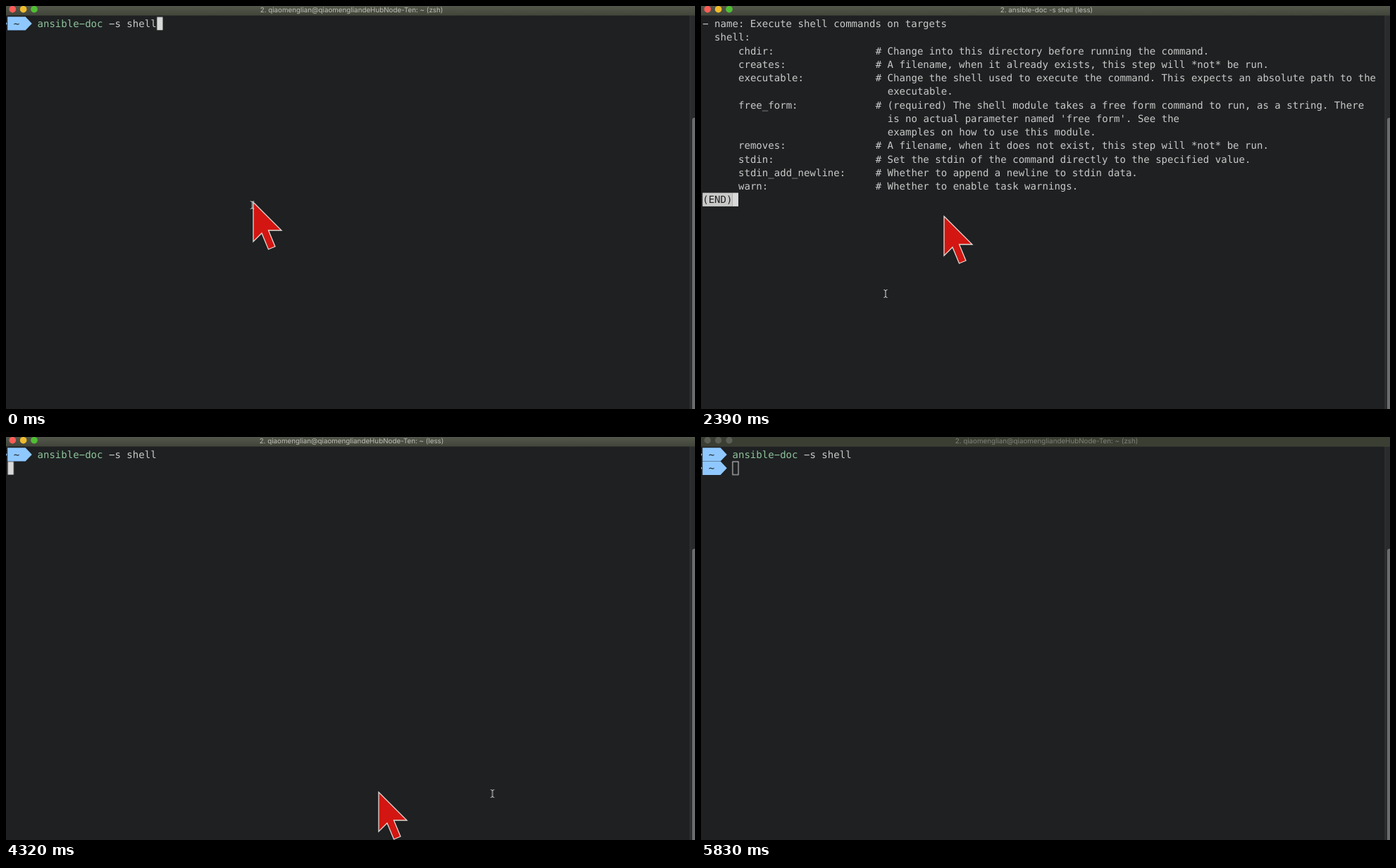
An HTML page for the animation above (5.93 s loop, 978x573 px).

```html
<!DOCTYPE html>
<html lang="en">
<head>
<meta charset="utf-8">
<title>Terminal</title>
<style>
  html, body { margin: 0; width: 100%; height: 100%; overflow: hidden; background: #1e2022; }
  svg { display: block; }
  text { white-space: pre; text-rendering: geometricPrecision; }
  .mono { font: 14.063px "DejaVu Sans Mono", monospace; fill: #c9cac8; }
  .dark { fill: #1e2022; }
  .cmd { fill: #8fc39a; }
  .prompt { fill: #8fc8ff; }

  .bar, .lights, .titles, .names, .shell, .doc, .second, .cursor, .arrow, .beam {
    animation: 5930ms step-end infinite;
  }
  .titles { font: 9.8px Inter, sans-serif; text-anchor: middle; fill: #bcbdb5; animation-name: dim-title; }
  .names { animation-name: names; }
  .bar { animation-name: dim-bar; }
  .lights { animation-name: dim-lights; }
  .shell { animation-name: shell; }
  .doc { animation-name: doc; }
  .second { animation-name: second; }
  .cursor { fill: #d9d9d9; animation-name: cursor; }
  .arrow { fill: #d31611; stroke: #dedbd5; stroke-width: 1.3; animation-name: arrow; }
  .beam { fill: none; stroke: #dcdcdc; animation-name: beam; }

  /* Window loses focus */
  @keyframes dim-bar { 0% { opacity: 0; } 98.313% { opacity: 1; } }
  @keyframes dim-title { 0% { fill: #bcbdb5; } 98.313% { fill: #7e8177; } }
  @keyframes dim-lights { 0% { opacity: 1; } 98.313% { opacity: 0; } }

  @keyframes names {
    0% { transform: translateY(0); }
    15.177% { transform: translateY(-20px); }
    27.824% { transform: translateY(-40px); }
    37.942% { transform: translateY(-60px); }
    72.849% { transform: translateY(-80px); }
    86.003% { transform: translateY(0); }
  }

  /* Screen contents */
  @keyframes shell { 0% { opacity: 1; } 27.824% { opacity: 0; } 72.849% { opacity: 1; } }
  @keyframes doc { 0% { opacity: 0; } 27.824% { opacity: 1; } 72.849% { opacity: 0; } }
  @keyframes second { 0% { opacity: 0; } 75.379% { opacity: 1; } }
  @keyframes cursor {
    0% { transform: translate(213.9px, 15.3px); fill: #d9d9d9; stroke: none; }
    15.177% { transform: translate(2.2px, 34.6px); fill: #d9d9d9; stroke: none; }
    75.379% { transform: translate(44.5px, 34.6px); fill: #d9d9d9; stroke: none; }
    98.313% { transform: translate(44.5px, 34.6px); fill: none; stroke: #d9d9d9; }
  }

  /* The red arrow trails the text pointer */
  @keyframes arrow {
    0% { transform: translate(351px, 279px); }
    40.303% { transform: translate(345px, 299px); }
    42.833% { transform: translate(249px, 411px); }
    45.362% { transform: translate(251px, 413px); }
    60.37% { transform: translate(333px, 478px); }
    62.9% { transform: translate(356px, 495px); }
    67.959% { transform: translate(453px, 501px); }
    70.32% { transform: translate(529px, 505px); }
    75.379% { transform: translate(691px, 504px); }
    78.414% { transform: translate(729px, 507px); }
    80.944% { transform: translate(919px, 558px); }
    83.473% { transform: translate(936px, 560px); }
    86.003% { transform: translate(950px, 600px); }
  }
  @keyframes beam {
    0% { transform: translate(349.5px, 283px); }
    37.942% { transform: translate(353px, 290px); }
    40.303% { transform: translate(262px, 409px); }
    42.833% { transform: translate(293px, 436px); }
    45.362% { transform: translate(251.5px, 416.5px); }
    58.01% { transform: translate(317.5px, 471px); }
    60.37% { transform: translate(352px, 494px); }
    62.9% { transform: translate(355.5px, 499.5px); }
    65.43% { transform: translate(426px, 502.5px); }
    67.959% { transform: translate(527px, 507.5px); }
    72.849% { transform: translate(690.5px, 507px); }
    78.414% { transform: translate(827px, 532px); }
    80.944% { transform: translate(945px, 565px); }
    83.473% { transform: translate(950.5px, 573px); }
    88.532% { transform: translate(960px, 600px); }
  }
</style>
</head>
<body>
<svg width="978" height="573" viewBox="0 0 978 573">
  <defs>
    <linearGradient id="metal" x2="0" y2="1">
      <stop offset="0" stop-color="#53574b"/>
      <stop offset="1" stop-color="#42463a"/>
    </linearGradient>
    <g id="prompt">
      <path class="prompt" d="M2.2 0H27.6L36.8 9.65 27.6 19.3H2.2ZM0 7.6 1.6 9.65 0 11.7Z"/>
      <text class="mono dark" x="10.7" y="14.8">~</text>
    </g>
  </defs>

  <rect width="978" height="573" fill="#1e2022"/>
  <rect x="971" y="13" width="7" height="560" fill="#2a2b2c"/>
  <rect x="970.5" y="13" width="1" height="560" fill="#353637"/>
  <rect x="974" y="159" width="8" height="430" rx="3" fill="#6b6c6d"/>

  <rect width="978" height="13.5" fill="url(#metal)"/>
  <rect class="bar" width="978" height="13.5" fill="#3b3f33"/>
  <g fill="#5b5e54">
    <circle cx="9.3" cy="4.7" r="4.7"/>
    <circle cx="24.6" cy="4.7" r="4.7"/>
    <circle cx="40" cy="4.7" r="4.7"/>
  </g>
  <g class="lights">
    <circle cx="9.3" cy="4.7" r="4.8" fill="#fc5d56"/>
    <circle cx="24.6" cy="4.7" r="4.8" fill="#f0bb2c"/>
    <circle cx="40" cy="4.7" r="4.8" fill="#50bf33"/>
  </g>
  <svg class="titles" width="978" height="13">
    <g class="names">
      <text x="490.5" y="8.6">2. qiaomenglian@qiaomengliandeHubNode-Ten: ~ (zsh)</text>
      <text x="490.5" y="28.6">2. ansible-doc -s shell (zsh)</text>
      <text x="490.5" y="48.6">2. ansible-doc -s shell (python2.7)</text>
      <text x="490.5" y="68.6">2. ansible-doc -s shell (less)</text>
      <text x="490.5" y="88.6">2. qiaomenglian@qiaomengliandeHubNode-Ten: ~ (less)</text>
    </g>
  </svg>

  <g class="shell">
    <use href="#prompt" y="15.3"/>
    <text class="mono" x="44.5" y="30.1"><tspan class="cmd">ansible−doc</tspan> −s shell</text>
    <use class="second" href="#prompt" y="34.6"/>
    <rect class="cursor" x=".4" y=".4" width="8.2" height="18.6"/>
  </g>

  <g class="doc mono">
    <text y="30.1"><tspan x="2.2">− name: Execute shell commands on targets</tspan
      ><tspan x="19.1" dy="19.25">shell:</tspan
      ><tspan x="53" dy="19.25">chdir:</tspan
      ><tspan x="53" dy="19.25">creates:</tspan
      ><tspan x="53" dy="19.25">executable:</tspan
      ><tspan x="53" dy="38.5">free_form:</tspan
      ><tspan x="53" dy="57.75">removes:</tspan
      ><tspan x="53" dy="19.25">stdin:</tspan
      ><tspan x="53" dy="19.25">stdin_add_newline:</tspan
      ><tspan x="53" dy="19.25">warn:</tspan></text>
    <text y="68.6"><tspan x="247.7"># Change into this directory before running the command.</tspan
      ><tspan x="247.7" dy="19.25"># A filename, when it already exists, this step will *not* be run.</tspan
      ><tspan x="247.7" dy="19.25"># Change the shell used to execute the command. This expects an absolute path to the</tspan
      ><tspan x="264.7" dy="19.25">executable.</tspan
      ><tspan x="247.7" dy="19.25"># (required) The shell module takes a free form command to run, as a string. There</tspan
      ><tspan x="264.7" dy="19.25">is no actual parameter named 'free form'. See the</tspan
      ><tspan x="264.7" dy="19.25">examples on how to use this module.</tspan
      ><tspan x="247.7" dy="19.25"># A filename, when it does not exist, this step will *not* be run.</tspan
      ><tspan x="247.7" dy="19.25"># Set the stdin of the command directly to the specified value.</tspan
      ><tspan x="247.7" dy="19.25"># Whether to append a newline to stdin data.</tspan
      ><tspan x="247.7" dy="19.25"># Whether to enable task warnings.</tspan></text>
    <rect x="2.2" y="265.6" width="42.4" height="19.3" fill="#c9cac8"/>
    <rect x="44.5" y="265.6" width="8.5" height="19.3" fill="#d9d9d9"/>
    <text class="dark" x="2.2" y="280.3">(END)</text>
  </g>

  <path class="arrow" d="M0 0 40 40H21.5L31 63 21.5 67 12 44 0 56Z"/>
  <path class="beam" d="M-2.5 -5.5Q0 -5.5 0 -3.5V3.5Q0 5.5 -2.5 5.5M2.5 -5.5Q0 -5.5 0 -3.5M0 3.5Q0 5.5 2.5 5.5"/>
</svg>
</body>
</html>
```
